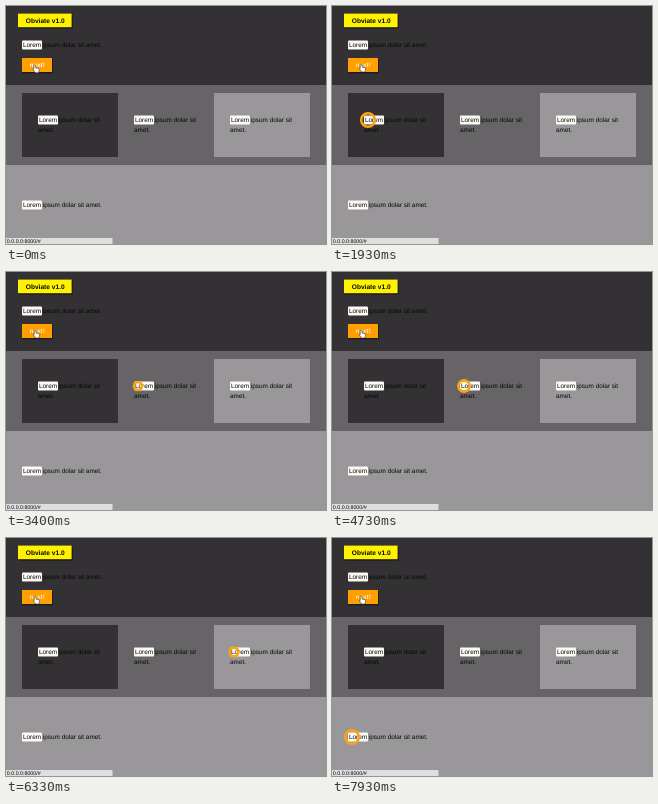
An HTML page for the animation above (8 s loop, 320 px wide and 238 px high).

```html
<!DOCTYPE html>
<html lang="en">
<head>
<meta charset="utf-8">
<title>Obviate</title>
<style>
  html, body { margin: 0; width: 100%; height: 100%; overflow: hidden; background: #999799; }
  svg { display: block; width: 100%; height: 100%; }
  text { font: 6.4px "Liberation Sans", Arial, sans-serif; fill: #080808; text-rendering: geometricPrecision; }
  .title { font-size: 6.6px; font-weight: bold; }
  .next { font-weight: bold; fill: #fff; }
  .status { font-size: 5.3px; }
  .mark { fill: #fbfaf4; }
  .dark { fill: #333133; }
  .mid { fill: #666466; }
  .light { fill: #999799; }
  .shadow { fill: #000; opacity: .45; }
  #ring { fill: none; stroke: #fca311; stroke-width: 2.6; }
</style>
</head>
<body>
<svg viewBox="0 0 320 238" preserveAspectRatio="none">
  <rect class="dark" width="320" height="79"/>
  <rect class="mid" y="79" width="320" height="80"/>
  <rect class="light" y="159" width="320" height="79"/>
  <rect class="dark" x="16" y="87" width="96" height="64"/>
  <rect class="light" x="208" y="87" width="96" height="64"/>

  <rect class="shadow" x="12.4" y="8.4" width="54.4" height="14.2"/>
  <rect x="12" y="7.6" width="53.6" height="13.6" fill="#fff200"/>
  <text class="title" x="19.8" y="16.7">Obviate v1.0</text>

  <rect class="shadow" x="16.4" y="53" width="30.4" height="14.4"/>
  <rect x="16" y="52" width="30" height="14" fill="#ff9f00"/>
  <text class="next" id="next" x="23.6" y="61.2">next!</text>

  <g id="copy"></g>

  <rect y="232" width="106.5" height="6" fill="#dededf"/>
  <text class="status" x="0.8" y="236.8">0.0.0.0:8000/#</text>

  <circle id="ring"/>
  <path id="hand" fill="#fff" stroke="#333" stroke-width=".6" stroke-linejoin="round"
    d="M1.6 0Q2.6 0 2.6 1V3L5.6 3.7Q6.4 4 6.3 5L5.6 8H2.4L.2 5.2Q-.1 4.3.8 4.5V1Q.8 0 1.6 0Z"/>
</svg>
<script>
const byId = id => document.getElementById(id);
const ring = byId('ring'), hand = byId('hand'), next = byId('next');

const LOOP = 8000, STEP = 2000, FIRST_MOVE = 750, MOVE = 500, PULSE = 1000;
const stops = [[-16, -16], [36, 114], [132, 114], [228, 114], [20, 199]];

function addCopy(x, y, lines) {
  const rest = lines.map((line, i) =>
    `<text x="${x + (i ? 0 : 20.9)}" y="${y + 2.3 + i * 9.6}">${line}</text>`).join('');
  byId('copy').insertAdjacentHTML('beforeend',
    `<rect class="mark" x="${x}" y="${y - 4.5}" width="20" height="9" rx="1"/>
     <text x="${x + 1}" y="${y + 2.3}">Lorem</text>${rest}`);
}

addCopy(16, 39, ['ipsum dolar sit amet.']);
for (const x of [32, 128, 224]) addCopy(x, 114, ['ipsum dolar sit', 'amet.']);
addCopy(16, 199, ['ipsum dolar sit amet.']);

const clamp = v => Math.min(1, Math.max(0, v));
const ease = p => p * p * (3 - 2 * p);

function ringCenter(t) {
  const leg = Math.min(3, Math.max(0, Math.floor((t - FIRST_MOVE) / STEP)));
  const p = ease(clamp((t - FIRST_MOVE - leg * STEP) / MOVE));
  const [from, to] = [stops[leg], stops[leg + 1]];
  return from.map((v, i) => v + (to[i] - v) * p);
}

function draw(now) {
  const t = now % LOOP;
  const [x, y] = ringCenter(t);
  const outer = 6.7 + 1.4 * Math.cos(2 * Math.PI * (t + 50) / PULSE);
  ring.setAttribute('cx', x);
  ring.setAttribute('cy', y);
  ring.setAttribute('r', outer - 1.3);

  const pressed = t >= 100;
  next.style.opacity = pressed ? .75 : 1;
  hand.setAttribute('transform', pressed ? 'translate(27.4 58)' : 'translate(27 58.8)');
}

const start = performance.now();
function tick() {
  draw(performance.now() - start);
  requestAnimationFrame(tick);
}
tick();
</script>
</body>
</html>
```
